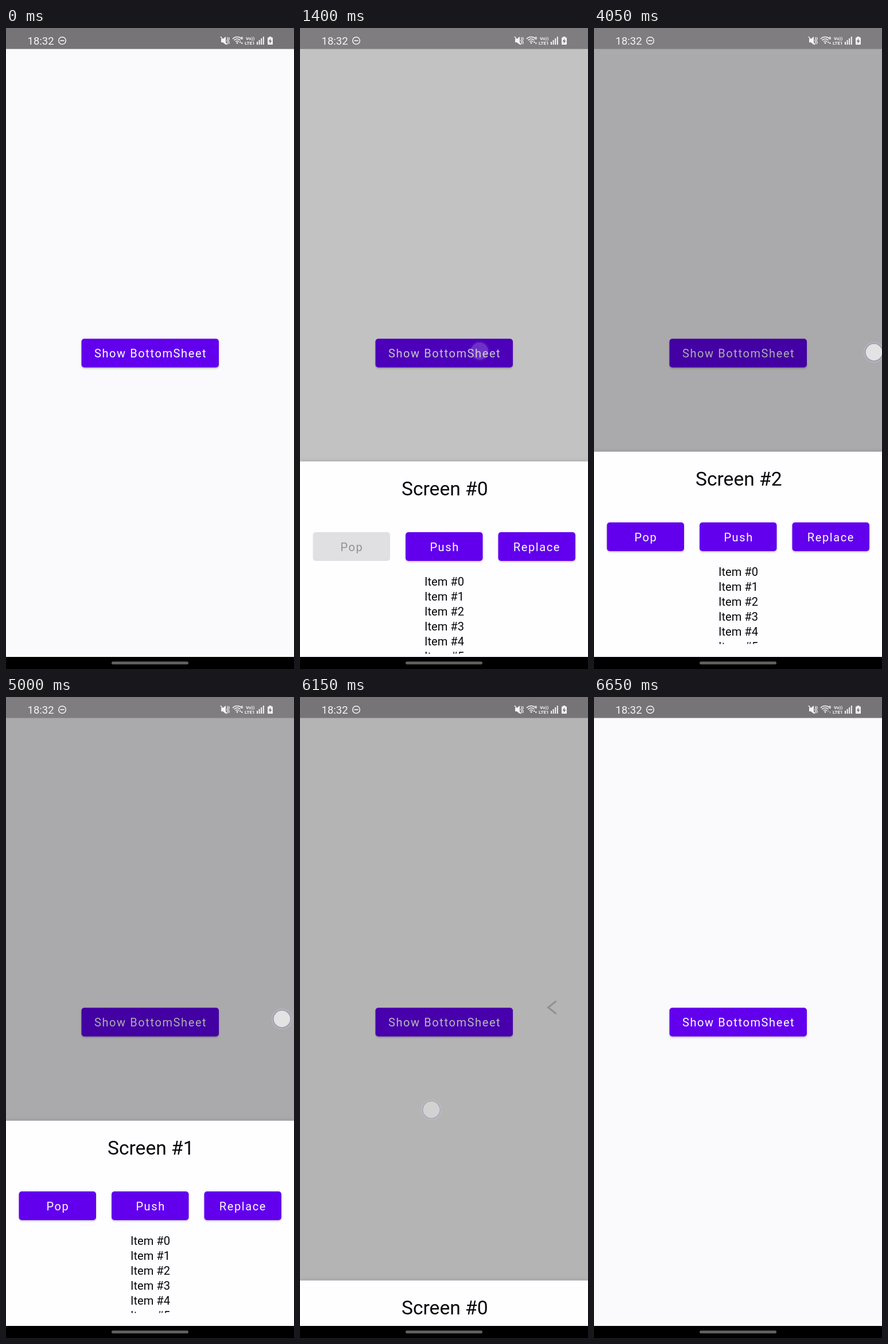
Animation of 502x1115 px, one loop 6800 ms. Source, as an HTML page with a canvas:

```html
<!DOCTYPE html>
<html lang="en">
<head>
<meta charset="utf-8">
<title>Bottom sheet navigation</title>
<style>
html, body { margin: 0; width: 100%; height: 100%; overflow: hidden; }
canvas { display: block; width: 502px; height: 1115px; }
</style>
</head>
<body>
<canvas id="stage" width="502" height="1115"></canvas>
<script>
const c = document.getElementById('stage').getContext('2d');
const LOOP = 6800, TICK = 50, TAU = Math.PI * 2;
const FONT = 'Roboto, "Open Sans", sans-serif';
const PURPLE = '#6200ee';
const OPEN = 1276, CLOSE = 6076;      // start of the sheet's springs
const DIM = 1265, UNDIM = 6090;       // start of the scrim's fades
const SHEET_Y = 737, BOTTOM = 1094;

// Taps and back swipes: down, up, start and end position
const touches = [
  { down: 1100, up: 1240, from: [313, 562] },
  { down: 2350, up: 2400, from: [283, 893] },
  { down: 2700, up: 2780, from: [283, 893] },
  { down: 4050, up: 4220, from: [488, 564], to: [232, 690] },
  { down: 5000, up: 5170, from: [481, 560], to: [230, 690] },
  { down: 5850, up: 6060, from: [490, 584], to: [229, 718] }
];

const clamp = v => Math.max(0, Math.min(1, v));
const mix = (a, b, p) => a + (b - a) * p;

// Critically damped spring, 0 to 1
function spring(ms) {
  const x = Math.max(0, ms) * 0.0387;
  return 1 - (1 + x) * Math.exp(-x);
}

// cubic-bezier(.4, 0, .2, 1)
function ease(p) {
  p = clamp(p);
  let lo = 0, hi = 1, s = p;
  for (let i = 0; i < 20; i++) {
    s = (lo + hi) / 2;
    const x = 1.2 * s * (1 - s) ** 2 + 0.6 * s * s * (1 - s) + s ** 3;
    if (x < p) lo = s; else hi = s;
  }
  return s * s * (3 - 2 * s);
}

function rect(x, y, w, h, color) {
  c.fillStyle = color;
  c.fillRect(x, y, w, h);
}

function text(s, x, y, size, color, spacing = 0, weight = 400) {
  c.font = `${weight} ${size}px ${FONT}`;
  c.letterSpacing = spacing + 'px';
  c.fillStyle = color;
  c.fillText(s, x, y);
}

function line(points, width, color) {
  c.beginPath();
  points.forEach(([x, y]) => c.lineTo(x, y));
  c.lineWidth = width;
  c.strokeStyle = color;
  c.stroke();
}

function arc(x, y, r, width, color, a = 0, b = TAU) {
  c.beginPath();
  c.arc(x, y, r, a, b);
  c.lineWidth = width;
  c.strokeStyle = color;
  c.stroke();
}

function shape(points, color) {
  c.beginPath();
  points.forEach(([x, y]) => c.lineTo(x, y));
  c.fillStyle = color;
  c.fill();
}

function pill(x, y, w, h, r, color) {
  c.beginPath();
  c.roundRect(x, y, w, h, r);
  c.fillStyle = color;
  c.fill();
}

function button(label, x, y, w, textX, on = true) {
  c.save();
  if (on) {
    c.shadowColor = 'rgba(0,0,0,.2)';
    c.shadowBlur = 3;
    c.shadowOffsetY = 2;
  }
  pill(x, y, w, 50, 5, on ? PURPLE : '#e0dfe1');
  c.restore();
  text(label, textX, y + 32.5, 20, on ? '#fff' : '#929193', 1.6);
}

function statusBar(t) {
  const ink = '#f5f4f5';
  rect(0, 0, 502, 36.5, t >= 1250 && t < 6100 ? '#7f7d7f' : '#777477');
  text('18:32', 37.5, 28.5, 18.5, ink);
  arc(98, 22, 6.3, 1.5, ink);
  line([[94.5, 22], [101.5, 22]], 1.7, ink);

  // Muted speaker with vibration
  shape([[375, 19], [378, 19], [383, 15], [383, 29], [378, 25], [375, 25]], ink);
  line([[374, 15], [385, 29]], 1.5, ink);
  for (const x of [385.5, 388.2])
    line([[x, 16], [x + 1, 19], [x - 0.5, 22], [x + 1, 25], [x, 28]], 1.2, ink);

  // Wi-Fi
  for (const r of [4, 7.5, 11])
    arc(403, 26.5, r, 1.6, ink, -Math.PI * 0.76, -Math.PI * 0.24);
  shape([[401, 25], [405, 25], [403, 28]], ink);
  text('6', 409.3, 20, 7, ink, 0, 700);
  c.globalAlpha = t >= 6650 ? 0.4 : 1;
  shape([[406.5, 25.5], [408.3, 22.8], [410.1, 25.5]], ink);
  shape([[409.5, 25.5], [413.1, 25.5], [411.3, 28.5]], ink);
  c.globalAlpha = 1;

  text('Vo))', 418, 20.5, 8, ink, 0, 700);
  text('LTE1', 416, 29, 8, ink, 0, 700);
  [5, 8, 11, 14].forEach((h, i) => rect(437 + i * 3.6, 29 - h, 2, h, ink));

  // Charging battery
  rect(458.5, 15, 4, 2, ink);
  pill(456, 16.5, 9, 12.5, 1, ink);
  shape([[461.5, 18], [457.5, 23.5], [460, 23.5], [459.5, 27.5],
    [463.5, 22], [461, 22]], '#777477');
}

function sheet(y, n) {
  c.save();
  c.beginPath();
  c.rect(0, 0, 502, BOTTOM);
  c.clip();
  c.save();
  c.shadowColor = 'rgba(0,0,0,.14)';
  c.shadowBlur = 8;
  rect(0, y, 502, 400, '#fefdff');
  c.restore();
  text('Screen #' + n, 177, y + 58.5, 33.6, '#080808');
  button('Pop', 22.5, y + 123, 134.5, 70.4, n > 0);
  button('Push', 184, y + 123, 134.5, 226.4);
  button('Replace', 345.5, y + 123, 134.5, 371.8);
  c.beginPath();
  c.rect(0, y + 190, 502, 144.5);
  c.clip();
  for (let i = 0; i < 6; i++)
    text('Item #' + i, 217, y + 216 + i * 26, 20.1, '#080808');
  c.restore();
}

function touch(t, { down, up, from, to = from }) {
  if (t < down || t > up + 300) return;
  const p = clamp((t - down) / (up - down));
  const x = mix(from[0], to[0], p), y = mix(from[1], to[1], p);

  // Back arrow at the right edge
  if (to !== from && t > down) {
    const ax = mix(505, 432.5, clamp((t - down) / 140)), ay = from[1] - 44;
    const a = 0.3 * clamp(1 - (t - up) / 250);
    line([[ax + 14, ay - 11], [ax, ay], [ax + 14, ay + 11]], 3, `rgba(0,0,0,${a})`);
  }

  c.globalAlpha = clamp(1 - (t - up) / 225);
  c.beginPath();
  c.arc(x, y, 15, 0, TAU);
  c.fillStyle = 'rgba(255,255,255,.67)';
  c.fill();
  arc(x, y, 17, 2.5, 'rgba(255,255,255,.12)');
  arc(x, y, 15, 1.6, 'rgba(120,105,175,.45)');
  c.globalAlpha = 1;
}

function draw(t) {
  const shown = spring(t - OPEN) - spring(t - CLOSE);
  const dim = 0.32 * (ease((t - DIM) / 300) - ease((t - UNDIM) / 300));
  const pushes = (t >= 2410) + (t >= 2790);
  const pops = (t >= 4230) + (t >= 5180);

  rect(0, 0, 502, 1115, '#faf9fb');
  button('Show BottomSheet', 131.5, 540.5, 239.5, 154);
  rect(0, 36, 502, BOTTOM - 36, `rgba(0,0,0,${dim})`);
  if (shown > 0.002) sheet(Math.round(mix(BOTTOM, SHEET_Y, shown)), pushes - pops);
  statusBar(t);
  rect(0, BOTTOM, 502, 21, '#000');
  pill(184, 1102, 134, 5, 2.5, '#5f5f5f');
  touches.forEach(f => touch(t, f));
}

function frame(now) {
  draw(Math.floor(now % LOOP / TICK) * TICK);
  requestAnimationFrame(frame);
}
requestAnimationFrame(frame);
</script>
</body>
</html>
```
